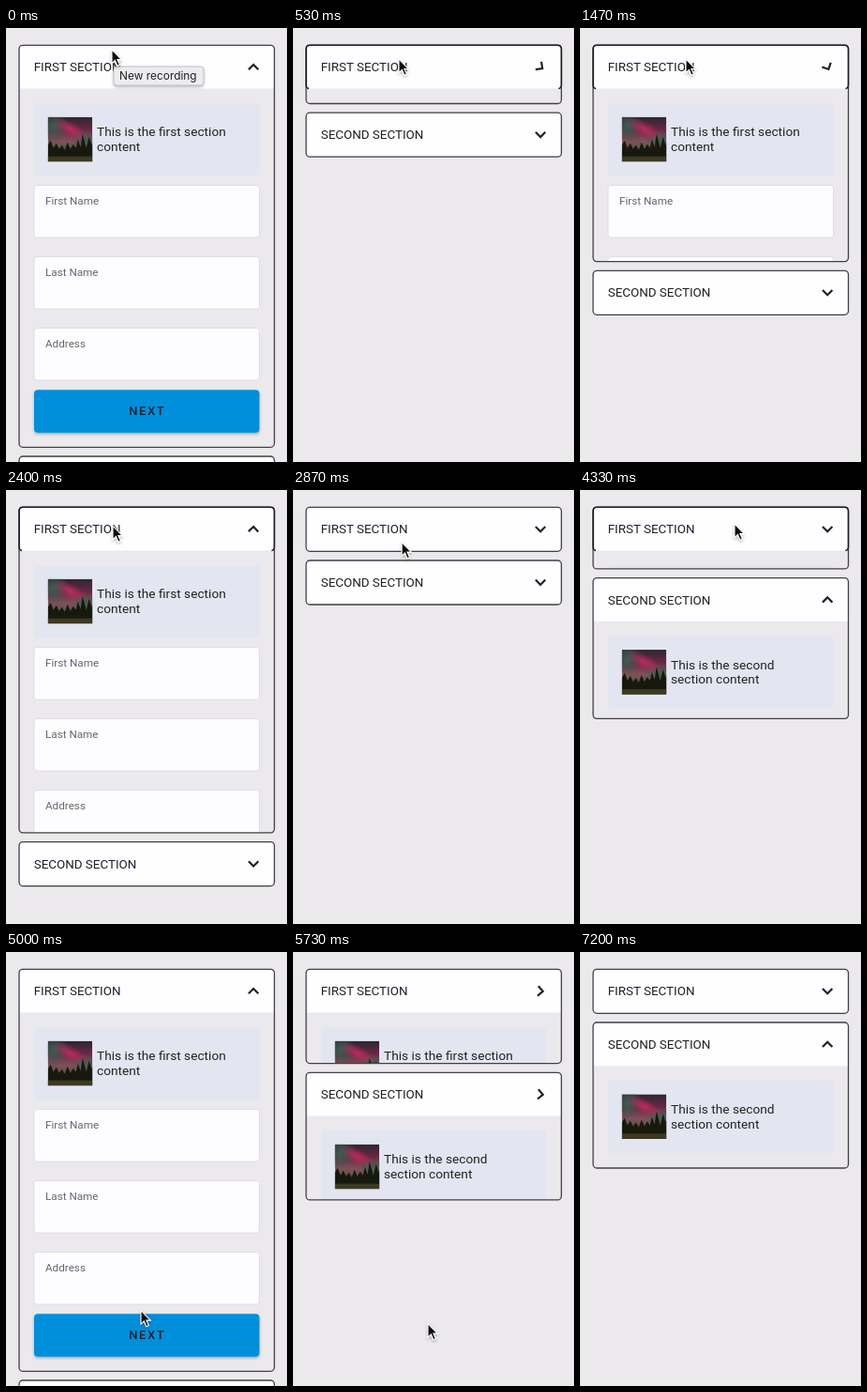
Animation of 300x462 px, one loop 7.34 s. Source, as an HTML page:

```html
<!DOCTYPE html>
<html lang="en">
<head>
<meta charset="utf-8">
<title>Accordion</title>
<style>
  html, body { margin: 0; width: 100%; height: 100%; overflow: hidden; background: #ebe9ec; }
  svg { display: block; width: 100vw; height: 100vh; }
  text { font-family: Roboto, sans-serif; fill: #222; }
  .title { font-size: 13.4px; }
  .copy { font-size: 13.7px; }
  .label { font-size: 11.7px; fill: #68666a; }
  .next { font-size: 13px; font-weight: 500; letter-spacing: 1.6px; fill: #14222e; }
  .tip { font-family: Inter, sans-serif; font-size: 11.9px; }
  .frame { fill: none; stroke: #414042; stroke-width: 1.3; }
  .ring { fill: none; stroke: #1c1c1e; stroke-width: 1.5; }
  .chevron { fill: none; stroke: #222; stroke-width: 2.2; }
</style>
</head>
<body>
<svg id="stage" viewBox="0 0 300 462">
  <defs>
    <linearGradient id="sky" x2="0" y2="1">
      <stop offset="0" stop-color="#2b2730"/>
      <stop offset=".3" stop-color="#6d2745"/>
      <stop offset=".55" stop-color="#80505a"/>
      <stop offset=".75" stop-color="#4c5a42"/>
      <stop offset="1" stop-color="#2c2a1c"/>
    </linearGradient>
    <radialGradient id="green">
      <stop offset="0" stop-color="#37604f"/>
      <stop offset="1" stop-color="#37604f" stop-opacity="0"/>
    </radialGradient>
    <radialGradient id="pink">
      <stop offset="0" stop-color="#b92c5c"/>
      <stop offset="1" stop-color="#b92c5c" stop-opacity="0"/>
    </radialGradient>
    <filter id="shadow" x="-20%" y="-30%" width="140%" height="180%">
      <feDropShadow dx="0" dy="1.5" stdDeviation="1.5" flood-opacity=".3"/>
    </filter>
    <clipPath id="photoClip"><rect width="47.5" height="47.5"/></clipPath>
    <g id="photo" clip-path="url(#photoClip)">
      <rect width="47.5" height="47.5" fill="url(#sky)"/>
      <ellipse cx="6" cy="10" rx="16" ry="18" fill="url(#green)"/>
      <ellipse cx="40" cy="24" rx="15" ry="10" fill="url(#green)"/>
      <ellipse cx="24" cy="13" rx="22" ry="8" fill="url(#pink)" transform="rotate(28 24 13)"/>
      <path fill="#17190f" d="M0 48V30l3-5 3 8 3-5 3 6 3-4 3 5 3-8 3 7 3-5 3 4 2-9 3 8 2-14 4 15 3-12 3 9 2-6V48Z"/>
      <rect y="42" width="47.5" height="5.5" fill="#4b4629" opacity=".75"/>
    </g>
  </defs>
  <g id="cards"></g>
  <g id="tooltip">
    <rect x="115" y="41" width="96" height="20" rx="3.5" fill="#eeecef" stroke="#b5b3b7" stroke-width=".8" filter="url(#shadow)"/>
    <text class="tip" x="121" y="55.2">New recording</text>
  </g>
  <path id="cursor" fill="#0b0b0b" stroke="#fff" stroke-width="1.1" filter="url(#shadow)"
    d="M0 0V14.6L3.4 11.5L5.9 17.3L8.4 16.2L5.9 10.6H10.3Z"/>
</svg>
<script>
const LOOP = 7340, SLIDE = 500, CHEVRON_DELAY = 120;
const TOP = 18.3, CLOSED = 47, GAP = 9.7;
const $ = id => document.getElementById(id);

const field = (name, y) => `
  <rect x="30" y="${y}" width="240.5" height="55.5" rx="3" fill="#fdfcfe" stroke="#dedce1" stroke-width=".9"/>
  <text class="label" x="42" y="${y + 20.6}">${name}</text>`;

const form = field('First Name', 149.2) + field('Last Name', 225.2) + field('Address', 301.2) + `
  <rect x="30" y="367" width="240.5" height="45.5" rx="4" fill="#048fdb" filter="url(#shadow)"/>
  <text class="next" x="150.8" y="394" text-anchor="middle">NEXT</text>`;

const sections = [
  { title: 'FIRST SECTION', lines: ['This is the first section', 'content'], extra: form,
    body: 381, open: 1, toggles: [95, 1227, 2248, 4260, 5353] },
  { title: 'SECOND SECTION', lines: ['This is the second', 'section content'], extra: '',
    body: 108, open: 0, toggles: [3100, 4260, 5370] }
];

$('cards').innerHTML = sections.map((s, i) => `
  <g class="card">
    <clipPath id="clip${i}"><rect class="size" x="14" width="272.5" rx="4"/></clipPath>
    <g clip-path="url(#clip${i})">
      <rect x="14" width="272.5" height="46.2" fill="#fefdff"/>
      <rect x="30" y="62" width="240.5" height="77" rx="2" fill="#e3e6f0"/>
      <use href="#photo" x="44.7" y="76.4"/>
      <text class="copy" x="97" y="97.2">${s.lines[0]}</text>
      <text class="copy" x="97" y="112.8">${s.lines[1]}</text>
      ${s.extra}
    </g>
    <text class="title" x="29.7" y="28">${s.title}</text>
    <path class="chevron" d="M-5.2-2.7L0 2.6L5.2-2.7"/>
    <rect class="frame size" x="14" width="272.5" rx="4"/>
    <path class="ring" d="M17 46.2Q14 46 14 42V4Q14 0 18 0H282.5Q286.5 0 286.5 4V42Q286.5 46 283.5 46.2"/>
  </g>`).join('');
const cards = [...document.querySelectorAll('.card')];

// Pointer stops: time, x, y
const stops = [
  [70, 113, 23], [200, 113, 33], [1900, 113, 33], [2400, 114, 38], [2750, 114, 38],
  [3050, 120, 88], [3350, 126, 88], [3800, 160, 65], [4150, 165, 36], [4400, 165, 36],
  [5000, 144, 381.5], [5150, 144, 395.5]
];
const POINTER_GONE = 6300;

const swing = x => .5 - .5 * Math.cos(Math.PI * Math.min(1, Math.max(0, x)));

// Each toggle eases the section to its other state.
const openness = (s, t) => s.toggles.reduce((value, start, i) =>
  value + (s.open + i & 1 ? -1 : 1) * swing((t - start) / SLIDE), s.open);

function pointerAt(t) {
  let [, x, y] = stops[0];
  for (let i = 1; i < stops.length; i++) {
    const [t0, x0, y0] = stops[i - 1], [t1, x1, y1] = stops[i];
    const k = swing((t - t0) / (t1 - t0));
    x += (x1 - x0) * k;
    y += (y1 - y0) * k;
  }
  return [x, y];
}

function draw(t) {
  const [px, py] = pointerAt(t);
  let top = TOP;
  sections.forEach((s, i) => {
    const card = cards[i], height = CLOSED + s.body * openness(s, t);
    const angle = -180 * openness(s, t - CHEVRON_DELAY);
    const hovered = t >= 70 && t < POINTER_GONE && py > top && py < top + 46;
    card.setAttribute('transform', `translate(0 ${top})`);
    card.querySelectorAll('.size').forEach(r => r.setAttribute('height', height));
    card.querySelector('.chevron').setAttribute('transform', `translate(264.2 23.3) rotate(${angle})`);
    card.querySelector('.ring').style.display = hovered && height > CLOSED + 1 ? '' : 'none';
    top += height + GAP;
  });
  $('tooltip').style.display = t < 70 ? '' : 'none';
  $('cursor').style.display = t < POINTER_GONE ? '' : 'none';
  $('cursor').setAttribute('transform', `translate(${px} ${py})`);
}

const begin = performance.now();
function tick() {
  draw((performance.now() - begin) % LOOP);
  requestAnimationFrame(tick);
}
tick();
</script>
</body>
</html>
```
